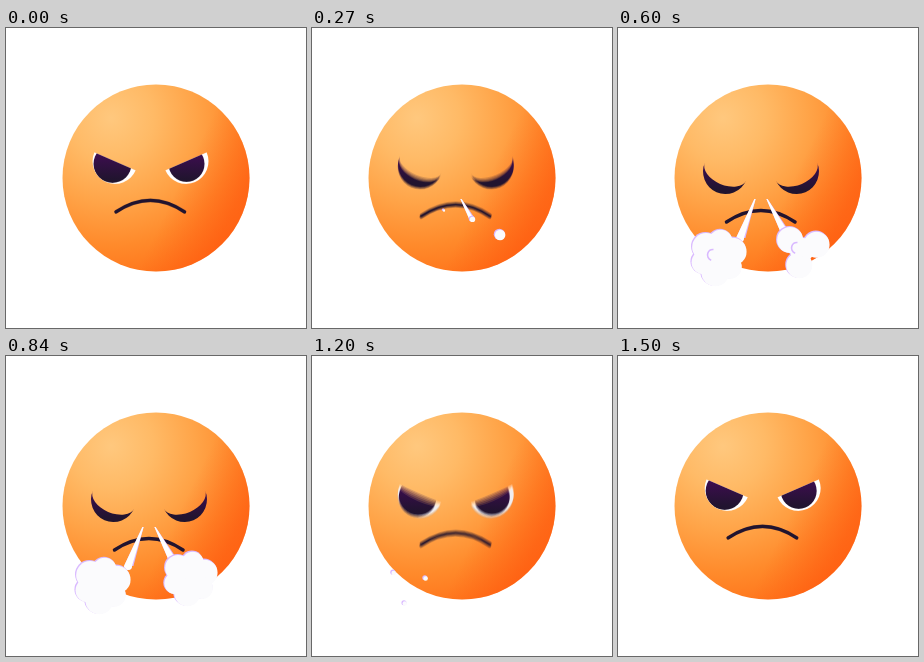
An HTML page with a canvas for the animation above (1530 ms loop, 300 by 300 pixels).

```html
<!DOCTYPE html>
<html lang="en">
<head>
<meta charset="utf-8">
<title>Huffing face</title>
<style>
html, body { margin: 0; width: 100%; height: 100%; overflow: hidden; background: #fff; }
canvas { display: block; width: 300px; height: 300px; }
</style>
</head>
<body>
<canvas id="stage" width="300" height="300"></canvas>
<script>
const ctx = document.getElementById('stage').getContext('2d');
const layer = document.createElement('canvas');
layer.width = layer.height = 300;
const face = layer.getContext('2d');

const LOOP = 1530, TAU = Math.PI * 2;
const INK = '#21142f', LILAC = '#d9b9ff', STEAM = '#fbfbfd';
const EYE_R = 22.5, TILT = 0.41;

const clamp = v => Math.max(0, Math.min(1, v));
const mix = (a, b, p) => a + (b - a) * p;
const easeOut = p => 1 - (1 - p) ** 3;
const ramp = (t, from, to) => clamp((t - from) / (to - from));
const ease = (t, from, to) => {
  const p = ramp(t, from, to);
  return p * p * (3 - 2 * p);
};

function addStops(gradient, ...colors) {
  colors.forEach((color, i) => gradient.addColorStop(i / (colors.length - 1), color));
  return gradient;
}

const skin = addStops(face.createRadialGradient(105, 90, 0, 105, 90, 170),
  '#ffc87e', '#ffba66', '#ffa448', '#ff8a2b', '#ff7018');
const glow = addStops(face.createLinearGradient(182, 138, 236, 164),
  'rgba(255,84,14,0)', 'rgba(255,84,14,.5)');
const pupil = addStops(face.createLinearGradient(0, -12, 0, 18), '#430c56', INK);

function disc(c, x, y, r, fill) {
  c.beginPath();
  c.arc(x, y, r, 0, TAU);
  c.fillStyle = fill;
  c.fill();
}

// Half circle below a lid that sags from straight (0) to fully shut (1).
function drawEye(x, y, side, lid, irisX, irisR) {
  const shut = ramp(lid, 0.15, 0.45);
  face.save();
  face.translate(x, y);
  face.scale(side, 1);
  face.beginPath();
  face.ellipse(0, 0, EYE_R, EYE_R, TILT, 0, Math.PI);
  face.ellipse(0, 0, EYE_R, EYE_R * lid, TILT, Math.PI, 0, true);
  face.closePath();
  face.fillStyle = '#fff';
  if (shut < 1) face.fill();
  face.globalAlpha = shut;
  face.fillStyle = pupil;
  face.fill();
  face.globalAlpha = 1;
  if (shut < 1) {
    face.clip();
    disc(face, irisX, 2.5, irisR, pupil);
  }
  face.restore();
}

function drawFace(t) {
  const y = -8 * ease(t, 0, 110) + 18 * ease(t, 110, 370) + 2.5 * ease(t, 900, 1080)
    - 14.5 * ease(t, 1110, 1290) + ease(t, 1400, LOOP);
  const x = -0.15 * y;
  const lid = 0.6 * ease(t, 150, 290) + 0.18 * ease(t, 900, 1080) - 0.78 * ease(t, 1110, 1230);
  face.fillStyle = '#fff';
  face.fillRect(0, 0, 300, 300);
  disc(face, 150, 150, 93.5, skin);
  disc(face, 150, 150, 93.5, glow);
  drawEye(109 + x, 133.5 + y, 1, lid, -2.5, 19);
  drawEye(180 + x, 133.5 + y, -1, lid, -0.5, 18);

  const mouthY = 184 + y - ease(t, 1110, 1290);
  face.beginPath();
  face.moveTo(110 + x, mouthY);
  face.quadraticCurveTo(144.5 + x, mouthY - 23, 178.5 + x, mouthY);
  face.lineWidth = 3.5;
  face.lineCap = 'round';
  face.strokeStyle = INK;
  face.stroke();
}

const left = {
  nose: [137, 171], mouth: [122, 210], center: [100, 229], drift: -4,
  start: 255, swell: 400, end: 1230, size: 14
};
const right = {
  nose: [149, 171], mouth: [167, 205], center: [184, 222], drift: 0,
  start: 190, swell: 510, end: 1100, size: 13
};

function drawCone({ nose, mouth, start }, t) {
  const head = easeOut(ramp(t, start + 30, start + 230));
  const tail = ease(t, 890, 1010);
  if (head <= tail) return;
  const at = p => nose.map((v, i) => mix(v, mouth[i], p));
  const [x0, y0] = at(tail), [x1, y1] = at(head);
  const w = 4 * head * (1 - tail);
  for (const [shift, fill] of [[1.4, LILAC], [0, '#fff']]) {
    ctx.beginPath();
    ctx.moveTo(x0 - 0.6, y0);
    ctx.lineTo(x0 + 0.6, y0);
    ctx.lineTo(x1 + w + shift, y1);
    ctx.arc(x1, y1, w, 0, Math.PI);
    ctx.fillStyle = fill;
    ctx.fill();
  }
}

// Three puffs fly out of the nose, then a core and three more fill the gaps.
function cloudPuffs({ nose, center, drift, start, swell, end, size }, t) {
  const cx = center[0] + drift * ease(t, 600, 840), cy = center[1];
  const late = ramp(t, swell, swell + 200);
  const lateLeft = 1 - ramp(t, 880, end - 120) ** 2;
  const puffs = [[cx, cy, size * 1.25 * late * lateLeft]];
  for (let i = 0; i < 6; i++) {
    const flies = i % 2 === 0;
    const faded = ramp(t, 880, end) ** 2;
    const angle = (100 + 60 * i) / 360 * TAU;
    const ring = 15.5 * (1 + 0.25 * faded);
    const x = cx + ring * Math.cos(angle), y = cy + ring * Math.sin(angle);
    if (flies) {
      const birth = start + 20 * (4 - i);
      const p = ramp(t, birth, birth + 200), q = easeOut(p);
      puffs.push([mix(nose[0], x, q), mix(nose[1], y, q), size * p * (1 - faded)]);
    } else {
      puffs.push([mix(cx, x, late), mix(cy, y, late), size * 0.85 * late * lateLeft]);
    }
  }
  return puffs.filter(puff => puff[2] > 0.3);
}

function drawJet(jet, t) {
  drawCone(jet, t);
  const puffs = cloudPuffs(jet, t);
  puffs.forEach(([x, y, r]) => disc(ctx, x - 0.8, y - 0.8, r + 0.3, LILAC));
  puffs.forEach(([x, y, r]) => disc(ctx, x, y, r, STEAM));

  ctx.globalAlpha = ease(t, 480, 570) * (1 - ease(t, 630, 740));
  ctx.beginPath();
  ctx.arc(jet.center[0] - 5, jet.center[1] - 2, 5.5, 1.9, 4.8);
  ctx.lineWidth = 1.6;
  ctx.strokeStyle = LILAC;
  ctx.stroke();
  ctx.globalAlpha = 1;
}

function draw(t) {
  const samples = 6, shutter = 30;
  // Averaging several moments softens fast moves.
  for (let i = 0; i < samples; i++) {
    const offset = (i / (samples - 1) - 0.5) * shutter;
    drawFace(Math.max(0, Math.min(LOOP, t + offset)));
    ctx.globalAlpha = 1 / (i + 1);
    ctx.drawImage(layer, 0, 0);
  }
  ctx.globalAlpha = 1;
  drawJet(left, t);
  drawJet(right, t);
}

function tick() {
  draw(performance.now() % LOOP);
  requestAnimationFrame(tick);
}
tick();
</script>
</body>
</html>
```
